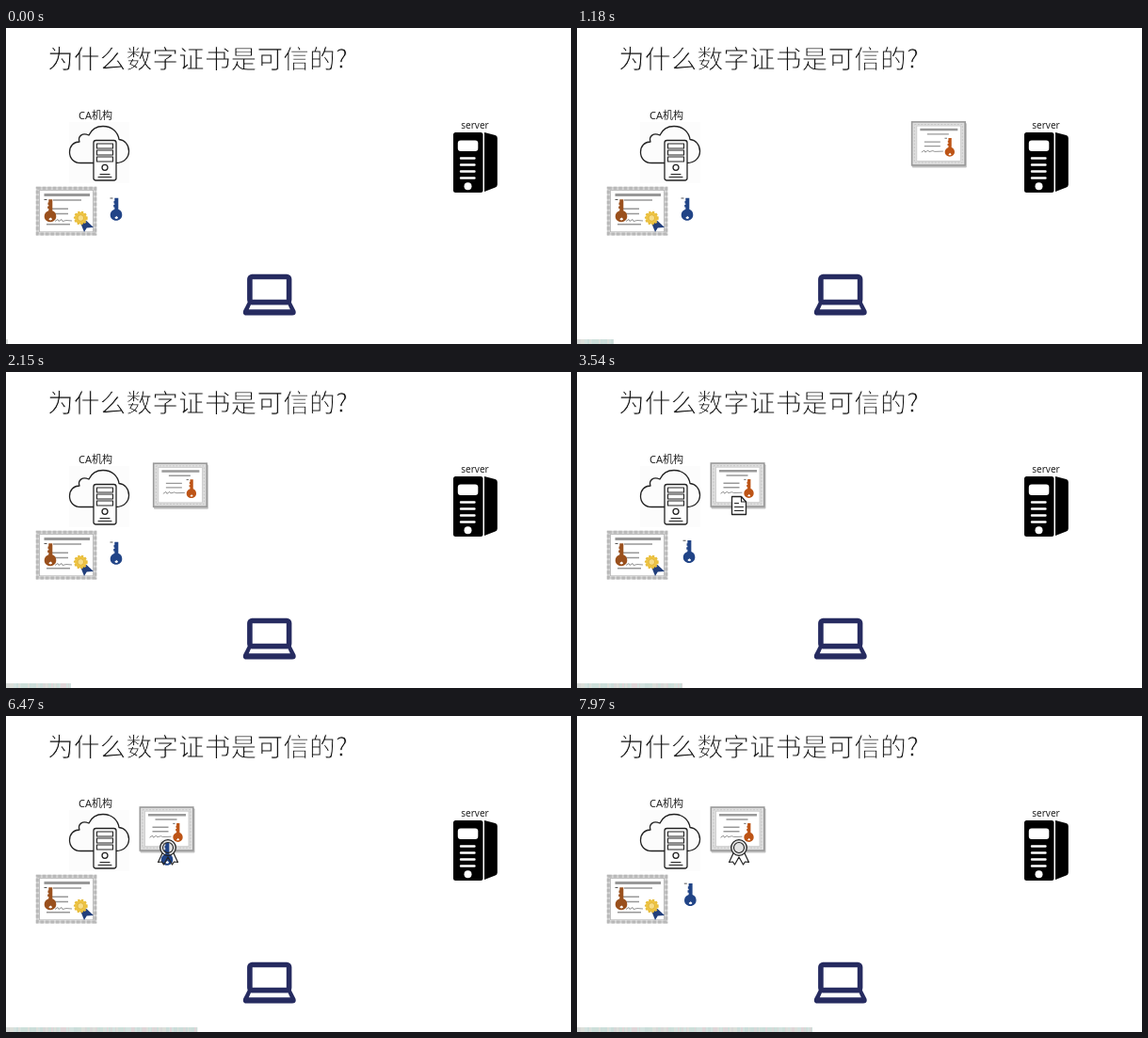
An HTML page for the animation above (8 s loop, 600 by 336 pixels).

```html
<!DOCTYPE html>
<html lang="zh">
<head>
<meta charset="utf-8">
<title>数字证书</title>
<style>
  html, body { margin: 0; width: 100%; height: 100%; overflow: hidden; background: #fff; }
  svg { display: block; width: 100vw; height: 100vh; }
  /* The white outline thins the strokes to a light weight. */
  .title { font: 300 27.8px "Noto Sans CJK SC", "Noto Sans CJK", sans-serif; fill: #111; stroke: #fff; stroke-width: .9; }
  .label { font-family: "Noto Sans", "Noto Sans CJK SC", "Noto Sans CJK", sans-serif; fill: #222; }
  .line { fill: none; stroke: #222; stroke-width: 1.3; stroke-linecap: round; stroke-linejoin: round; }
</style>
</head>
<body>
<svg viewBox="0 0 600 336">
  <defs>
    <g id="key">
      <path d="M-6.500-12h3" stroke="#555" stroke-width="1"/>
      <path fill="currentColor" fill-rule="evenodd"
        d="M-1.700-12.300H2.300V-.2C5 .8 6.300 3 6.300 5.800C6.300 9.300 3.500 11.800 0 11.800S-6.300 9.300-6.300 5.800C-6.300 3-4.500 .8-1.700-.2V-2.500H-2.800V-5H-1.700V-6.500H-2.500V-9H-1.700ZM.4 7L-1.500 8.600C-1.800 10.400 2.200 10.400 2 8.600Z"/>
    </g>
    <clipPath id="barClip"><rect id="barRect" y="331" height="5"/></clipPath>
  </defs>
  <rect width="600" height="336" fill="#fff"/>
  <text class="title" x="44" y="42.800">为什么数字证书是可信的?</text>
  <text class="label" x="77" y="97" font-size="11">CA机构</text>
  <text class="label" x="483.300" y="107" font-size="10">server</text>

  <!-- certificate authority -->
  <rect x="67" y="100" width="64" height="65" fill="#fcfcfc"/>
  <path class="line" d="M93 143.500H79C72 143.500 67.500 138.500 67.500 132S72 121 78 121C76 115 81 111 88 114C91 107.500 97 104.500 103 104.500C113 104.500 119 111 120 118.500C126 119 130.500 124 130.500 131S125 143.500 117 143.500"/>
  <g class="line">
    <rect x="93" y="119.500" width="24" height="42.500" rx="2.500" fill="#fff"/>
    <path d="M96.500 123h17v5h-17zM96.500 130h17v5h-17zM96.500 137h17v5h-17zM100 155.500h10M98 158.500h14" stroke-width="1.1"/>
    <circle cx="105" cy="148.300" r="3"/>
  </g>

  <!-- root certificate -->
  <rect x="33.300" y="170.300" width="61.500" height="48.700" fill="#fff" stroke="#d2d2d2" stroke-width="3"/>
  <rect x="33.300" y="170.300" width="61.500" height="48.700" fill="none" stroke="#b8b8b8" stroke-width="3" stroke-dasharray="3.500 2"/>
  <rect x="35.500" y="172.500" width="57" height="44.300" fill="#fff" stroke="#bdbdbd"/>
  <g fill="none" stroke="#989898" stroke-width="1.600">
    <path d="M40.500 177.500H89" stroke-width="3"/>
    <path d="M50 183H80M49 192.300H66M49 197.500H66M43 208.800H68"/>
    <path d="M52 205.500l3-2 1 2 3-2 1 2 4-1 6 .5" stroke="#666" stroke-width=".7"/>
  </g>
  <path d="M79 207l4 10 2.800-4.500 7.200-.5-7.500-7z" fill="#223f7c"/>
  <circle cx="79.300" cy="202" r="6.300" fill="#efc544" stroke="#e7bd3c" stroke-width="2.200" stroke-dasharray="2.200 1.500"/>
  <circle cx="79.300" cy="202" r="3.300" fill="#f7dd86" stroke="#d9a92c" stroke-width=".7"/>
  <use href="#key" x="47" y="194.500" color="#9a501d"/>

  <!-- server -->
  <rect x="475" y="111" width="31.500" height="64" rx="2.500" fill="#000"/>
  <path d="M508 111l11.500 3q2.300 .7 2.300 3v49.500q0 2.300-2.200 3L508 174z" fill="#000"/>
  <rect x="479.800" y="119.500" width="21.500" height="11.500" rx="3" fill="#fff"/>
  <path d="M483 138.500h14.500M483 145.500h14.500M483 152.500h14.500M483 159.500h14.500" stroke="#fff" stroke-width="2.400" stroke-linecap="round"/>
  <circle cx="490.500" cy="168.300" r="4" fill="#fff"/>

  <!-- client -->
  <rect x="258.900" y="264.500" width="41.700" height="27" rx="2.500" fill="#fff" stroke="#262b60" stroke-width="5.600"/>
  <path d="M257.500 290H302L307.400 300.500Q308.800 305.500 304 305.500H255.500Q250.800 305.500 252.100 300.500ZM260 294.300L257.800 299.300H301.800L299.500 294.300Z" fill="#262b60" fill-rule="evenodd"/>

  <g id="cert">
    <rect x="1" y="2" width="58" height="47.300" rx="1" fill="#777" opacity=".45"/>
    <rect x=".8" y=".8" width="56.500" height="46" fill="#dedede" stroke="#999" stroke-width="1.600"/>
    <rect x="3.500" y="3.500" width="51" height="40.500" fill="none" stroke="#c4c4c4" stroke-dasharray="2 1.500"/>
    <rect x="6" y="5" width="46.500" height="37.500" fill="#fff" stroke="#c8c8c8" stroke-width=".8"/>
    <g fill="none" stroke="#999" stroke-width="1.400">
      <path d="M9.500 9H49.500" stroke-width="2.500"/>
      <path d="M17 13.800H40M14 22H31M14 26.500H31"/>
      <path d="M11 33l3-2 1 2 3-2 1 1.500 4-1 2 .8 9-.3" stroke="#666" stroke-width=".7"/>
    </g>
    <use href="#key" transform="translate(41 28) scale(.82)" color="#bd5416"/>
  </g>

  <g id="doc" class="line">
    <path d="M164.500 132.500h10l5 5.500v13.500h-15z" fill="#fff"/>
    <path d="M174.500 132.500v5.500h5M167.500 139.500h4M167.500 143.500h9M167.500 147.500h9" stroke-width="1.200"/>
  </g>

  <g id="medalBack" fill="#fff">
    <path d="M166 146l-4.500 9.500 4-.5 2 3 4.500-8 4.500 8 2-3 4 .5-4.500-9.500z"/>
    <circle cx="172" cy="140" r="8.500" fill="#e4e4e4"/>
  </g>
  <use id="blueKey" href="#key" color="#214487"/>
  <g id="medal" class="line">
    <path d="M166 146l-4.500 9.500 4-.5 2 3 4.500-8 4.500 8 2-3 4 .5-4.500-9.500" stroke-width="1.200"/>
    <circle cx="172" cy="140" r="8.300"/>
    <circle cx="172" cy="140" r="5.500" stroke-width="1.100"/>
  </g>

  <g id="bar" clip-path="url(#barClip)"></g>
</svg>
<script>
  const LOOP = 8000, TRAVEL = 1690, FADE = 750;
  const $ = id => document.getElementById(id);
  const clamp = v => Math.max(0, Math.min(1, v));
  const mix = (a, b, u) => a + (b - a) * u;
  const fade = (t, start) => clamp((t - start) / FADE);
  const glide = (t, start) => (1 - Math.cos(Math.PI * clamp((t - start) / TRAVEL))) / 2;
  const move = (id, x, y) => $(id).setAttribute('transform', `translate(${x.toFixed(2)} ${y.toFixed(2)})`);
  const show = (id, a) => $(id).setAttribute('opacity', a.toFixed(3));

  function buildBar() {
    const tints = ['#cddfda', '#d9d8d8', '#e0d5d8', '#d3e2df', '#dcdfda', '#cbddda'];
    let seed = 17, html = '<rect y="331" width="255" height="5" fill="#d8dcda"/>';
    const rand = () => (seed = seed * 16807 % 2147483647) / 2147483647;
    for (let x = 3; x < 255;) {
      const w = 1 + Math.floor(rand() * 3);
      const tint = tints[Math.floor(rand() * tints.length)];
      html += `<rect x="${x}" y="331" width="${w}" height="5" fill="${tint}"/>`;
      x += w;
    }
    $('bar').innerHTML = html;
  }

  function draw(t) {
    const c = glide(t, 717);
    move('cert', mix(400, 141.5, c), mix(99.7, 96.2, c));
    show('cert', fade(t, 40));

    show('doc', fade(t, 2430) - fade(t, 5780));

    const k = glide(t, 3330) - glide(t, 6550);
    move('blueKey', mix(117, 171, k), mix(193, 147, k));

    const m = fade(t, 5030);
    show('medalBack', m);
    show('medal', m);

    $('barRect').setAttribute('width', (2 + t * 0.0311).toFixed(1));
  }

  buildBar();
  const begin = performance.now();
  function tick() {
    draw((performance.now() - begin) % LOOP);
    requestAnimationFrame(tick);
  }
  tick();
</script>
</body>
</html>
```
